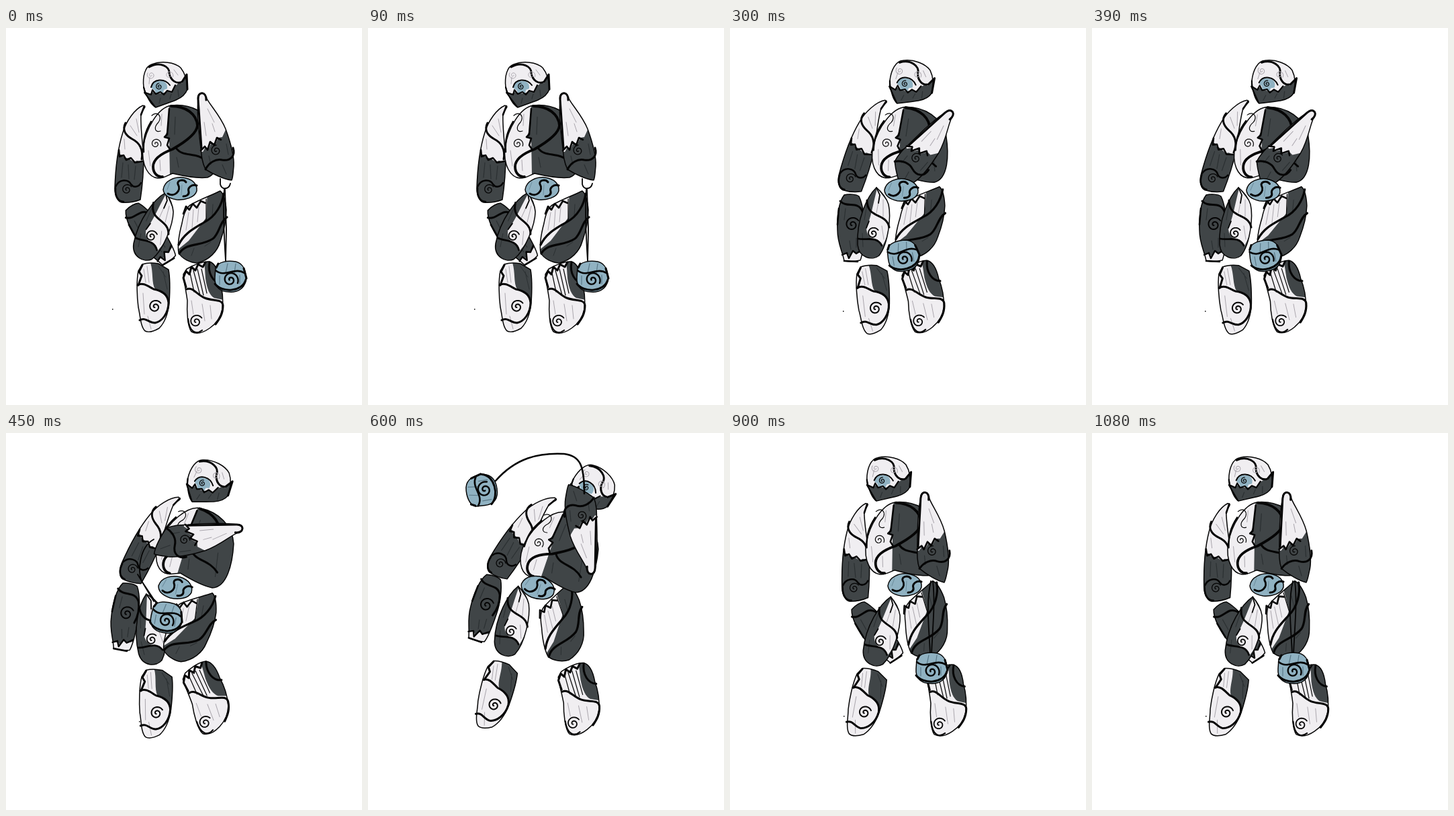
These frames come from a looping animation (530x560 px, 1.2 s). An HTML page with a canvas:

```html
<!DOCTYPE html>
<html lang="en">
<head>
<meta charset="utf-8">
<title>Stone golem swinging a flail</title>
<style>
  html, body { margin: 0; width: 100%; height: 100%; overflow: hidden; background: #fff; }
  canvas { display: block; }
</style>
</head>
<body>
<canvas id="stage" width="530" height="560"></canvas>
<script>
const ctx = document.getElementById('stage').getContext('2d');
const WHITE = '#f0eef1', DARK = '#404547', BLUE = '#90b2c2', INK = '#050505', GREY = '#aaa6ad', SHADE = '#2b3032';
const STEP = 150, LOOP = 1200, POSES = 7;

// Each part is drawn around its pivot; poses hold x, y and angle for every step.
// patches: [path, fill], lines: [path, width, colour], spirals: [x, y, radius, width, colour, turn]
const parts = [
  { // left shin
    pivot: [219, 400],
    poses: [219,400,0, 204,406,-10, 213,403,-3, 222,402,3, 189,390,16, 198,335,-6, 201,401,14],
    base: WHITE,
    outline: 'M203 351C212 348 221 349 227 350L242 359C245 375 244 392 243 408C241 427 236 438 228 446C221 450 212 453 207 450C200 443 200 427 197 415C195 400 194 375 197 361Z',
    patches: [['M214 346C220 360 216 378 222 388C230 393 238 396 243 405L252 345Z', DARK]],
    lines: [
      ['M205 358L208 378M210 354L213 378M204 394L206 425M211 428L216 447', 1, GREY],
      ['M227 354L238 370M234 362L240 388', 1, SHADE],
      ['M196 382C204 377 212 384 220 388C232 390 241 396 242 408C242 424 232 436 222 438C212 438 208 429 199 434', 3],
      ['M203 352L198 362L202 368L197 382', 3]
    ],
    spirals: [[222, 414, 10, 2, INK, 2]]
  },
  { // right shin
    pivot: [293, 401],
    poses: [293,401,0, 278,401,-12, 288,400,-5, 299,394,-12, 314,396,-3, 304,396,-10, 322,398,1],
    base: WHITE,
    outline: 'M264 366L269 358C281 351 292 346 303 347C312 350 316 360 318 375C322 388 324 402 322 418C319 432 312 440 303 446C293 453 283 455 276 451C270 443 269 420 270 405C268 390 265 378 264 366Z',
    patches: [['M295 343L297 372C299 387 303 397 310 401L324 404L332 343Z', DARK]],
    lines: [
      ['M276 405L279 425M292 410L296 435M304 412L306 432', 1, GREY],
      ['M274 364L280 392M279 360L289 397M285 358L294 397M291 358L299 394', 1.2],
      ['M269 388C278 384 284 396 296 401C308 406 322 402 323 412C323 425 318 432 312 440', 3],
      ['M303 348C300 364 308 378 320 379', 3],
      ['M268 385L264 371L268 361L273 366L276 355L282 360L286 351L293 355L297 348', 3],
      ['M271 432C273 452 283 456 292 449', 2.2]
    ],
    spirals: [[283, 436, 10, 1.8, INK, 2]]
  },
  { // left arm
    pivot: [193, 187],
    poses: [193,187,0, 184,202,-10, 204,175,13, 220,158,22, 234,154,29, 184,196,-13, 195,177,-3],
    base: WHITE,
    outline: 'M204 115C192 120 179 138 174 155C166 180 163 205 162 238C162 250 167 258 172 259C182 260 192 258 200 255C203 235 205 205 205 190C203 170 200 145 201 128C202 124 206 120 207 117Z',
    patches: [['M158 187L172 188L175 192L183 194L190 199L195 197L208 200L208 265L158 265Z', DARK]],
    lines: [
      ['M185 145L195 160M176 165L177 180M194 135L198 155', 1, GREY],
      ['M174 200L172 222M182 203L183 224M193 205L191 225', 1.2, SHADE],
      ['M178 141C172 152 179 160 188 165C198 170 205 180 202 195', 3],
      ['M168 181L169 191L175 189L179 196L186 193L192 200L203 198', 2.6],
      ['M163 236C168 224 182 224 186 232C190 238 198 236 201 230', 2.5],
      ['M163 238C162 250 167 258 175 258M201 129L206 116', 2.6]
    ],
    spirals: [[180, 240, 8, 1.3, INK, 2]]
  },
  { // left forearm
    pivot: [180, 297],
    poses: [214,306,-34, 220,321,-36, 180,297,0, 177,273,8, 173,260,16, 237,314,-31, 218,296,-36],
    base: DARK,
    outline: 'M170 248C178 246 188 247 192 250C198 262 201 285 200 300C199 322 197 338 194 345C186 347 176 347 170 346C167 330 160 320 160 300C159 280 162 258 170 248Z',
    patches: [['M164 352L167 338L174 334L178 339L184 332L189 335L202 330L202 352Z', WHITE]],
    lines: [
      ['M178 316L180 329M188 312L188 326M172 268L170 285', 1.2, SHADE],
      ['M164 257C174 268 190 256 197 272C200 282 199 294 195 304', 3],
      ['M167 337L174 334L177 342L183 331L188 335L197 329', 2.4],
      ['M162 268L160 292M170 346L190 347', 2.6]
    ],
    spirals: [[182, 292, 11, 2, INK, 2]]
  },
  { // left thigh
    pivot: [214, 290],
    poses: [221,295,14, 207,308,26, 214,290,0, 215,292,-11, 215,280,5, 222,249,62, 227,295,9],
    base: DARK,
    outline: 'M218 237C204 250 188 285 190 322C192 342 212 346 222 338C236 320 240 280 236 262C232 250 224 242 218 237Z',
    patches: [['M219 238C213 262 209 285 203 297C204 318 222 312 227 324C240 300 242 275 236 260Z', WHITE]],
    lines: [
      ['M222 253L218 275M228 255L228 280M226 294L229 314', 1, GREY],
      ['M204 262L200 285M197 305L198 325', 1, SHADE],
      ['M204 256C204 284 233 274 237 296', 3],
      ['M191 313C202 316 218 308 226 323', 2.8],
      ['M218 237L223 248L221 260M203 297L207 287', 1.8]
    ],
    spirals: [[213, 305, 9, 1.8, INK, 2]]
  },
  { // right thigh
    pivot: [300, 295],
    poses: [300,295,0, 292,299,12, 291,288,2, 282,288,7, 296,281,-19, 291,286,3, 299,276,-17],
    base: DARK,
    outline: 'M319 242C307 248 290 254 276 262C268 266 264 278 262 290C258 305 255 322 257 334C262 343 275 349 285 349C302 345 315 332 319 317C325 300 328 285 328 270C327 258 325 247 319 242Z',
    patches: [['M300 238L298 282L272 316L250 334L250 250Z', WHITE]],
    lines: [
      ['M272 274L268 300M279 270L277 297M287 266L285 288', 1, GREY],
      ['M308 262L307 280M280 327L276 338M296 324L305 318', 1, SHADE],
      ['M298 254L298 286', 1.2],
      ['M324 246C322 262 312 280 296 288C280 298 266 304 257 322', 3.2],
      ['M329 281C318 288 318 305 308 313C290 325 268 318 258 335', 3.2],
      ['M264 276L268 265L273 270L278 261L284 267L290 257L297 260', 2.6]
    ]
  },
  { // head
    pivot: [237, 84],
    poses: [237,84,0, 208,93,-2, 270,82,13, 302,75,20, 334,84,36, 202,82,-3, 236,69,7],
    base: WHITE,
    outline: 'M205 88C203 72 207 57 217 54C232 48 251 51 260 59C268 69 270 79 270 91C267 100 260 104 253 107C243 111 231 115 223 118C216 114 210 104 205 88Z',
    patches: [
      ['M203 92L214 99L219 95C224 98 234 98 240 94L247 94L252 86L257 82L262 82L268 69L277 90L250 122L220 124Z', DARK],
      ['M217 90C216 82 222 78 228 79C236 77 241 83 240 90L235 92L234 97L229 95L224 98L221 92Z', BLUE]
    ],
    lines: [
      ['M214 73L213 83M250 62L256 70', 1, GREY],
      ['M230 104L228 112M246 98L244 105M256 92L257 102', 1.2, SHADE],
      ['M213 58C228 49 244 57 243 67C245 78 254 84 262 80L269 69L270 91', 3],
      ['M205 88L207 96L216 99L218 92L223 98L230 95L235 99L240 93L247 95L252 85', 2.2],
      ['M216 88C219 75 236 74 244 85M206 96L222 117', 2]
    ],
    spirals: [[216, 70, 6, 1, GREY, 0], [243, 70, 6, 1, GREY, 3], [228, 87, 5, 1.2, INK, 1]]
  },
  { // torso
    pivot: [256, 168],
    poses: [256,168,0, 241,173,-10, 266,171,6, 282,165,18, 286,171,20, 245,160,-15, 255,156,2],
    base: WHITE,
    outline: 'M246 115C226 118 208 150 204 178C201 205 213 222 226 223C234 224 242 218 248 216C265 220 285 224 300 222C320 215 318 180 310 150C300 125 275 112 246 115Z',
    patches: [['M243 110L241 150L237 160L243 166L244 218L335 235L335 110Z', DARK]],
    lines: [
      ['M212 182L215 205M232 128L231 145M229 196L230 212', 1, GREY],
      ['M252 132L251 158M292 170L299 205M254 192L257 207', 1.2, SHADE],
      ['M246 116C268 116 284 128 285 145C284 158 262 172 248 180C232 186 219 194 219 206C219 216 226 222 233 221', 3.8],
      ['M253 178C263 193 282 183 300 198', 3],
      ['M243 120L240 158L236 162L243 164L240 174L244 180', 2.6],
      ['M217 130C226 122 233 132 227 140C219 148 222 156 230 153', 1.2],
      ['M216 139C207 154 204 166 205 184', 2.4]
    ],
    spirals: [[223, 172, 8, 1.2, INK, 3]]
  },
  { // right arm
    pivot: [307, 161],
    poses: [307,161,0, 283,161,3, 290,176,52, 287,154,93, 322,144,185, 274,150,8, 298,154,7],
    base: WHITE,
    outline: 'M286 104C285 96 294 94 297 101C301 112 318 128 327 150C335 172 340 190 339 205C338 215 338 222 336 226C325 225 308 217 297 210C292 200 291 190 290 178C287 155 284 125 286 104Z',
    patches: [['M284 182L293 184L297 177L302 179L306 170L312 172L316 163L322 162L328 149L347 150L347 232L290 232Z', DARK]],
    lines: [
      ['M300 120L310 140M295 140L298 160M307 142L311 154', 1, GREY],
      ['M302 190L305 203M328 172L331 188M322 203L328 217', 1.2, SHADE],
      ['M298 107C299 94 285 93 286 106L291 178', 3],
      ['M290 182L296 176L300 181L304 169L310 174L314 163L320 166', 2.6],
      ['M338 178C342 190 334 198 322 196C312 194 302 200 297 210', 3]
    ],
    spirals: [[313, 182, 8, 1.3, INK, 1]]
  },
  { // pelvis
    pivot: [259, 238],
    poses: [259,238,0, 257,240,0, 255,240,3, 252,229,9, 253,229,16, 267,225,-8, 260,225,0],
    base: BLUE,
    outline: 'M234 240C236 226 252 221 263 222C278 224 285 232 284 242C281 252 266 256 254 255C242 253 235 248 234 240Z',
    lines: [
      ['M244 229L240 240M262 233L261 248', 1, '#6d8d9d'],
      ['M241 246C250 252 262 242 256 232C254 226 264 224 268 229', 3],
      ['M284 234C276 231 270 238 272 243C273 248 268 250 264 250', 3]
    ]
  }
];

const ball = {
  pivot: [334, 369],
  poses: [334,369,0, 328,350,0, 258,338,-10, 239,274,10, 169,85,-100, 115,265,-20, 300,349,0],
  base: BLUE,
  outline: 'M312 356C316 347 330 345 342 347C354 350 358 362 357 376C354 388 344 393 332 392C318 392 310 384 311 370Z',
  lines: [
    ['M330 350L327 364M342 350L340 364M318 368L318 381M348 367L348 380', 1.2, '#5b7988'],
    ['M312 360C326 372 340 354 355 364', 2.6],
    ['M311 380C322 394 352 392 357 374', 3],
    ['M313 356L316 350M354 357L358 372', 3]
  ],
  spirals: [[334, 374, 12, 2.4, INK, 3]]
};

const chains = [
  'M319 224L319 232C321 241 332 240 334 231M325 239C323 265 324 300 327 346M326 239L328 300L327 346',
  'M292 225L293 235C296 240 304 240 305 231M299 238C300 265 299 305 318 328',
  '',
  'M220 158C198 170 196 205 202 220L226 256M196 210L220 250',
  'M190 71C220 37 254 29 292 31C316 34 322 48 322 90',
  'M139 272C176 275 215 274 238 256L262 235',
  'M299 220C291 255 297 295 298 330M302 220C306 255 301 295 300 330'
].map(d => new Path2D(d));

const specks = [[158, 417], [115, 410, 353, 269], [168, 420], [198, 428], [], [167, 272], [169, 420]];

function stroke(path, width, colour = INK) {
  ctx.lineWidth = width;
  ctx.strokeStyle = colour;
  ctx.stroke(path);
}

function spiral(x, y, radius, width, colour, turn) {
  const path = new Path2D();
  for (let i = 0; i <= 40; i++) {
    const r = radius * (0.12 + 0.88 * i / 40), a = turn + i / 40 * 10;
    path.lineTo(x + r * Math.cos(a), y + r * Math.sin(a));
  }
  stroke(path, width, colour);
}

function drawPart({ pivot, poses, base, outline, patches = [], lines, spirals = [] }, pose) {
  const [x, y, angle] = poses.slice(pose * 3, pose * 3 + 3);
  const shape = new Path2D(outline);
  ctx.save();
  ctx.translate(x, y);
  ctx.rotate(angle * Math.PI / 180);
  ctx.translate(-pivot[0], -pivot[1]);
  ctx.save();
  ctx.clip(shape);
  ctx.fillStyle = base;
  ctx.fill(shape);
  for (const [d, fill] of patches) {
    ctx.fillStyle = fill;
    ctx.fill(new Path2D(d));
  }
  ctx.restore();
  stroke(shape, 1.5);
  for (const [d, width, colour] of lines) stroke(new Path2D(d), width, colour);
  for (const s of spirals) spiral(...s);
  ctx.restore();
}

function draw(now) {
  const pose = Math.min(POSES - 1, Math.floor(now % LOOP / STEP));
  ctx.fillStyle = '#fff';
  ctx.fillRect(0, 0, 530, 560);
  ctx.lineCap = ctx.lineJoin = 'round';
  for (const part of parts) drawPart(part, pose);
  stroke(chains[pose], pose === 4 ? 2.6 : 1.8);
  drawPart(ball, pose);
  ctx.fillStyle = INK;
  for (let i = 0; i < specks[pose].length; i += 2) ctx.fillRect(specks[pose][i], specks[pose][i + 1], 1.5, 1.5);
  requestAnimationFrame(draw);
}
requestAnimationFrame(draw);
</script>
</body>
</html>
```
